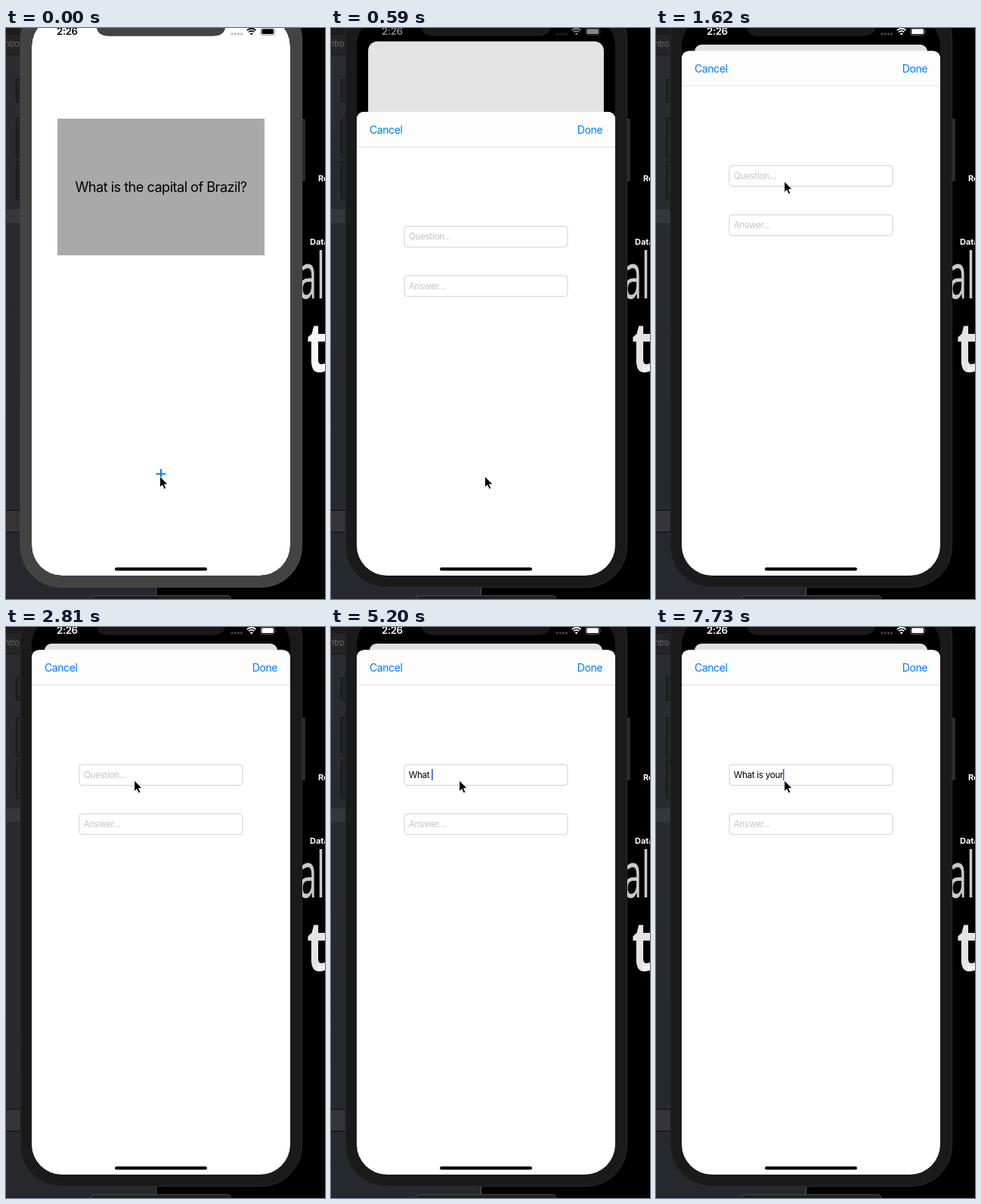
An HTML page for the animation above (8 s loop, 422 by 756 pixels).

```html
<!DOCTYPE html>
<html lang="en">
<head>
<meta charset="utf-8">
<title>Flashcard entry</title>
<style>
  html, body { margin: 0; height: 100%; overflow: hidden; background: #000; }
  svg { display: block; width: 100vw; height: 100vh; }
  text { font-family: Inter, "Open Sans", sans-serif; letter-spacing: -.03em; white-space: pre; }
  .stretched { font-family: "Open Sans", sans-serif; letter-spacing: 0; }
  .field { font-size: 11.8px; }
  .hint { fill: #c4c4c6; }
  .link { font-size: 14px; fill: #007aff; }
  .box { fill: #fff; stroke: #d0d0d0; }
  .label { font-size: 11px; font-weight: 700; fill: #fff; letter-spacing: 0; }
  .side { fill: #232427; stroke: #111; }
</style>
</head>
<body>
<svg viewBox="0 0 422 756">
  <defs>
    <clipPath id="screen"><rect x="34" y="-16" width="342" height="741" rx="40"/></clipPath>
    <linearGradient id="panel" x2="0" y2="1">
      <stop stop-color="#2b2c30"/><stop offset=".35" stop-color="#292a2f"/><stop offset="1" stop-color="#27282d"/>
    </linearGradient>
  </defs>

  <!-- desktop behind the phone -->
  <rect width="422" height="756"/>
  <rect width="198" height="756" fill="url(#panel)"/>
  <rect width="30" height="7" fill="#1d1d1e"/>
  <rect y="7" width="30" height="28" fill="#252527"/>
  <path d="M0 7.5H30M0 35.5H30" stroke="#161617"/>
  <text x="-2" y="25" font-size="11" fill="#69696c">ntro</text>
  <rect y="240" width="30" height="18" fill="#36373c"/>
  <rect x="-2" y="638.5" width="40" height="29" fill="#353538" stroke="#0d0d0d"/>
  <path d="M198.5 735V756" stroke="#55565a"/>
  <rect x="112.5" y="751.5" width="185" height="20" rx="4" fill="#202022" stroke="#4b4b4d"/>
  <text class="label" x="413" y="203">Re</text>
  <text class="label" x="402" y="287">Data</text>
  <g id="bigText">
    <text class="stretched" transform="translate(387 358) scale(.51 1)" font-size="85" fill="#c9c9c9">al</text>
    <text class="stretched" transform="translate(398 455) scale(.68 1)" font-size="91" font-weight="700">t</text>
  </g>
  <text class="label" x="412" y="455">in</text>

  <!-- phone body -->
  <rect class="side" x="13.5" y="67.5" width="8" height="30" rx="2"/>
  <rect class="side" x="13.5" y="119.5" width="8" height="52" rx="2"/>
  <rect class="side" x="13.5" y="176.5" width="8" height="51" rx="2"/>
  <rect x="388" y="120" width="8" height="83" rx="1.5" fill="#2b2b2b"/>
  <rect id="bezel" x="19" y="-40" width="372.5" height="780.5" rx="54"/>

  <g clip-path="url(#screen)">
    <rect x="34" y="-16" width="342" height="741"/>
    <g id="card">
      <rect class="page" x="34" y="-16" width="342" height="741" fill="#fff"/>
      <rect x="68" y="120" width="274" height="181" fill="#a9a9a9"/>
      <text x="205" y="217" font-size="18.2" text-anchor="middle">What is the capital of Brazil?</text>
      <path id="plus" d="M198.5 590.5H211.5M205 584V597" stroke="#007aff" stroke-width="2"/>
      <rect id="dim" class="page" x="34" y="-16" width="342" height="741"/>
    </g>
    <g id="sheet">
      <rect x="34" width="342" height="790" rx="9.5" fill="#fff"/>
      <path d="M34 46V9.5a9.5 9.5 0 0 1 9.5-9.5h323a9.5 9.5 0 0 1 9.5 9.5V46z" fill="#fdfdfd"/>
      <path d="M34 46.3H376" stroke="#dedede"/>
      <text class="link" x="51" y="28.5">Cancel</text>
      <text class="link" x="359" y="28.5" text-anchor="end">Done</text>
      <rect class="box" x="97" y="151.5" width="216" height="27.5" rx="4"/>
      <rect class="box" x="97" y="216.8" width="216" height="27.5" rx="4"/>
      <text id="question" class="field" x="102.7" y="169.2"></text>
      <text class="field hint" x="102.7" y="234.5">Answer...</text>
      <rect id="caret" y="157.3" width="1.7" height="15.5" rx=".8" fill="#4166d8"/>
    </g>
    <rect x="144" y="714.3" width="122" height="4.2" rx="2.1"/>
  </g>

  <path id="notch" d="M114 -2Q119.5 -2 120 0C121 7 127 10.7 137 10.7H273C283 10.7 289 7 290 0Q290.500 -2 296 -2z"/>
  <g id="status">
    <text x="67" y="9.400" font-size="13.3" font-weight="600">2:26</text>
    <g opacity=".25">
      <circle cx="299" cy="8" r="1.700"/><circle cx="303.300" cy="8" r="1.700"/>
      <circle cx="307.500" cy="8" r="1.700"/><circle cx="311.500" cy="8" r="1.700"/>
    </g>
    <path d="M318.900 3.200A8.200 8.200 0 0 1 330.500 3.200M321.100 5.400A5.100 5.100 0 0 1 328.300 5.400" fill="none" stroke="currentColor" stroke-width="1.800"/>
    <path d="M324.700 9.500L322.800 7.500A2.700 2.700 0 0 1 326.600 7.500z"/>
    <rect x="336.800" y="-.2" width="18.600" height="9.600" rx="2.600" fill="none" stroke="currentColor" stroke-opacity=".4"/>
    <rect x="338.200" y="1.200" width="15.800" height="6.800" rx="1.500"/>
    <path d="M356.500 3.200q1.500 1.400 0 2.800z" opacity=".45"/>
  </g>

  <path id="pointer" d="M0 0V14.800L3.400 11.700L5.700 17L8.300 15.900L6 10.700H10.600z" stroke="#fff" stroke-width="1"/>
</svg>
<script>
const LOOP = 8000;
const OPENING = [0, 290, 440, 590, 730, 880, 1030, 1180, 1330, 1470, 1620];
const SENTENCE = "What is your";
// [time, number of characters typed]
const TYPING = [[0, 0], [3850, 1], [4450, 2], [4600, 3], [4900, 4], [5200, 5], [5350, 6],
  [5500, 7], [5950, 8], [7140, 9], [7440, 11], [7730, 12]];
// [time, caret opacity]
const BLINK = [[0, 0], [2070, 1], [2670, .4], [2810, 0], [3110, 1], [3550, .4], [3700, 0],
  [3850, 1], [6550, .25], [6700, 0], [7000, 1]];

const el = Object.fromEntries([...document.querySelectorAll("[id]")].map(e => [e.id, e]));
const pages = document.querySelectorAll(".page");
const set = (node, attrs) => Object.entries(attrs).forEach(([k, v]) => node.setAttribute(k, v));
const clamp = x => Math.min(1, Math.max(0, x));
const ramp = (t, from, to) => clamp((t - from) / (to - from));
const smooth = x => x * x * (3 - 2 * x);
const mix = (a, b, x) => a + (b - a) * x;
const valueAt = (steps, t) => steps.findLast(([start]) => start <= t)[1];

function drawOpening(t) {
  const active = t >= 290;
  const body = active ? "#1a1a1a" : "#434343";
  set(el.bezel, { fill: body, stroke: active ? "#2b2b2b" : "#484848" });
  set(el.notch, { fill: body });
  set(el.bigText, { fill: active ? "#e4e4e4" : "#f8f8f8" });

  // the sheet decays exponentially to its resting place
  const shown = t < 423 ? 0 : 1 - Math.exp(-(t - 423) * .0129);
  const scale = 1 - .1 * shown;
  set(el.sheet, { transform: `translate(0 ${mix(725, 30.5, shown)})`, visibility: shown ? "visible" : "hidden" });
  set(el.card, { transform: `translate(${205 * (1 - scale)} ${36.5 * shown}) scale(${scale})` });
  pages.forEach(page => set(page, { rx: mix(40, 10, shown) }));
  set(el.dim, { opacity: .12 * shown });
  set(el.plus, { opacity: !active ? 1 : t < 440 ? .3 : .48 });

  const grey = Math.round(255 * ramp(t, 500, 670));
  const tone = `rgb(${grey},${grey},${grey})`;
  set(el.status, { fill: tone, color: tone });

  const travel = smooth(ramp(t, 690, 1340));
  const x = mix(203.5, 169.7, travel);
  const y = mix(593.5, 210, travel) - 7 * ramp(t, 1330, 1600);
  set(el.pointer, { transform: `translate(${x} ${y})` });
}

function drawTyping(t) {
  const count = valueAt(TYPING, t);
  const typed = SENTENCE.slice(0, count).replace(/ /g, "\u00a0");
  el.question.textContent = typed || "Question...";
  el.question.classList.toggle("hint", !count);
  const width = count ? el.question.getComputedTextLength() : 0;
  set(el.caret, { x: 102.4 + width, opacity: valueAt(BLINK, t) });
}

function frame() {
  const t = performance.now() % LOOP;
  drawOpening(OPENING.findLast(start => start <= t));
  drawTyping(t);
  requestAnimationFrame(frame);
}
frame();
</script>
</body>
</html>
```
